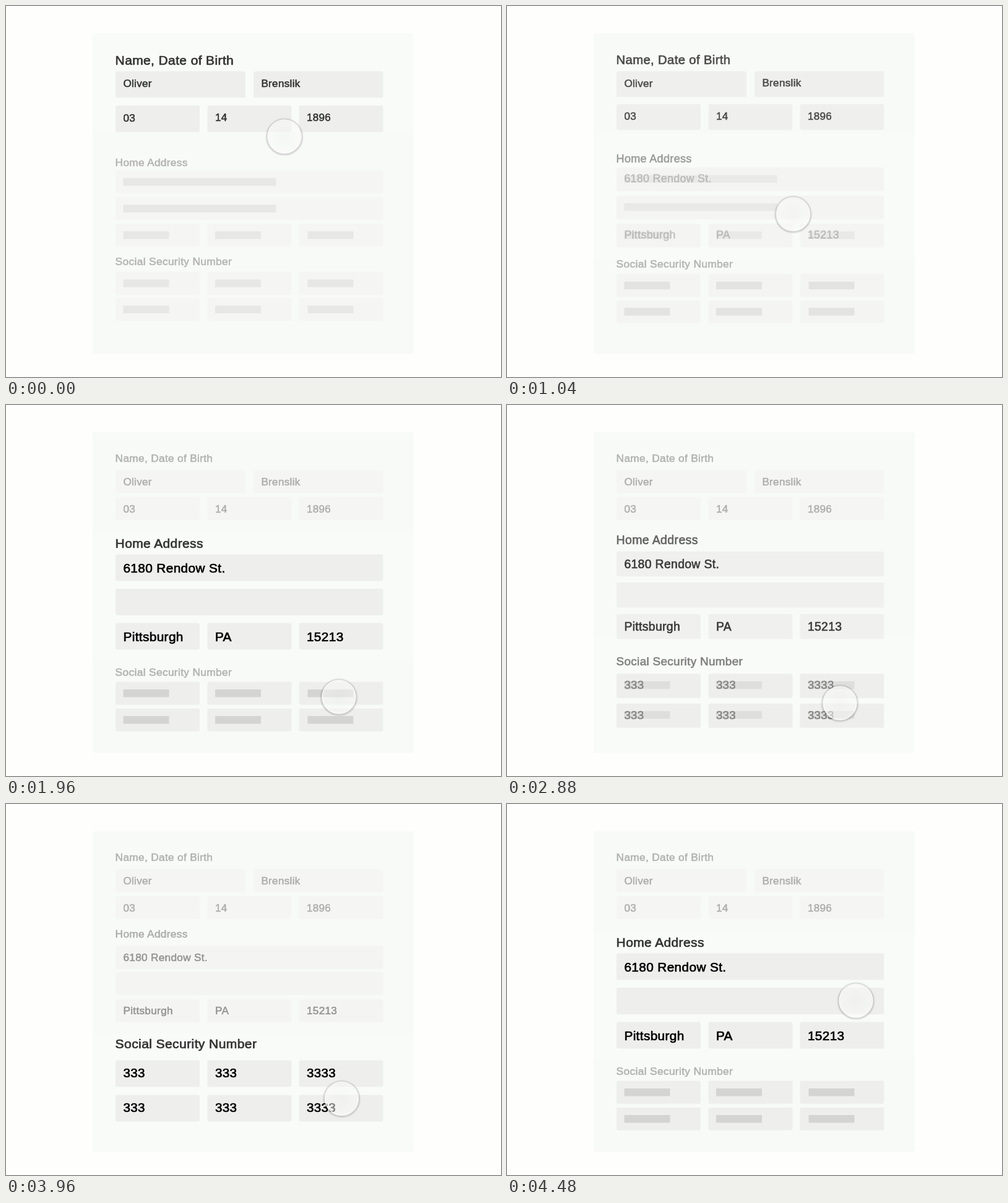
Recreate the animation shown at these times as an HTML page. Size 800 px wide and 600 px high, loop 4760 ms.

```html
<!DOCTYPE html>
<html lang="en">
<head>
<meta charset="utf-8">
<title>Form focus</title>
<style>
  html, body { margin: 0; width: 100%; height: 100%; overflow: hidden; background: #fefefc; }
  svg { display: block; width: 800px; height: 600px; }
  text {
    font-family: "Liberation Sans", Arial, Helvetica, sans-serif;
    letter-spacing: .018em;
    stroke-width: .034em;
    stroke-linejoin: round;
  }
  .shadow { filter: blur(1.3px); }
</style>
</head>
<body>
<svg id="stage" viewBox="0 0 800 600">
  <defs>
    <radialGradient id="glass">
      <stop offset="0" stop-color="#f1f3f0" stop-opacity=".5"/>
      <stop offset="1" stop-color="#fbfcfa" stop-opacity=".52"/>
    </radialGradient>
  </defs>
  <rect x="140" y="44" width="518.5" height="518.5" rx="3" fill="#f8faf8"/>
  <g id="form"></g>
  <g id="cursor">
    <circle class="shadow" cy=".7" r="28.2" fill="none" stroke="#000" stroke-opacity=".22" stroke-width="2.4"/>
    <circle r="27.6" fill="url(#glass)"/>
    <circle r="26.7" fill="none" stroke="#fdfdfc" stroke-opacity=".75" stroke-width="1.8"/>
  </g>
</svg>
<script>
const LOOP = 4760, TICK = 40;
const COLUMNS = {
  1: [[177, 432.5]],
  2: [[177, 210], [400, 209.5]],
  3: [[177, 136], [325.5, 136], [473.5, 136]]
};

// Every list of three holds the values while section 1, 2 or 3 has the focus.
const sections = [
  {
    title: "Name, Date of Birth",
    band: [44, 205],
    head: { y: [95, 91.7, 91.7], size: [21, 17.3, 17.3], gray: [51, 178, 178] },
    box: { h: [43, 37, 37], gray: [238, 245, 245] },
    text: { dy: [25, 24.5, 24.5], size: [17.1, 17.1, 17.1], gray: [51, 174, 174], alpha: [1, 1, 1] },
    bar: { gray: [231, 231, 231], alpha: [0, 0, 0] },
    rows: [
      { y: [105.5, 105.5, 105.5], words: ["Oliver", "Brenslik"] },
      { y: [161, 149, 149], words: ["03", "14", "1896"] }
    ]
  },
  {
    title: "Home Address",
    band: [205, 412],
    head: { y: [258.5, 231, 215.6], size: [17.3, 21, 17.3], gray: [180, 51, 172] },
    box: { h: [37, 43, 37], gray: [245, 238, 244] },
    text: { dy: [22.2, 29.3, 24.1], size: [17.1, 20.8, 17.2], gray: [0, 0, 148], alpha: [0, 1, 1] },
    bar: { gray: [231, 226, 231], alpha: [1, 0, 0], width: 247 },
    rows: [
      { y: [266, 241.5, 229.5], words: ["6180 Rendow St."] },
      { y: [309, 297, 272], words: [""] },
      { y: [352, 352.5, 316], words: ["Pittsburgh", "PA", "15213"] }
    ]
  },
  {
    title: "Social Security Number",
    band: [372, 562],
    head: { y: [419, 438, 395.3], size: [17.4, 17.4, 21.1], gray: [180, 178, 51] },
    box: { h: [37, 37, 43], gray: [245, 238, 238] },
    text: { dy: [23.3, 23.3, 27.2], size: [17.3, 17.3, 20.6], gray: [0, 0, 0], alpha: [0, 0, 1] },
    bar: { gray: [231, 212, 212], alpha: [1, 1, 0] },
    rows: [
      { y: [430, 447.7, 414.5], words: ["333", "333", "3333"] },
      { y: [472.3, 490.7, 470.5], words: ["333", "333", "3333"] }
    ]
  }
];

// lead: how far the easing has run when the change first shows
const focusChanges = [
  { at: 1040, from: 0, to: 1, lead: .155 },
  { at: 2880, from: 1, to: 2, lead: .245 },
  { at: 4320, from: 2, to: 1, lead: .155 }
];

const moves = [
  { start: 215, end: 480, from: [450, 211], to: [462.5, 336.5] },
  { start: 1450, end: 1600, from: [462.5, 336.5], to: [506, 406] },
  { start: 1735, end: 1960, from: [506, 406], to: [538, 472] },
  { start: 2340, end: 2600, from: [538, 472], to: [538, 482] },
  { start: 3935, end: 4160, from: [538, 482], via: [605, 400], to: [564, 318] }
];

const form = document.getElementById("form");
const cursor = document.getElementById("cursor");
const clamp = x => Math.min(1, Math.max(0, x));
const smooth = x => x * x * (3 - 2 * x);
const tone = g => { const n = Math.round(g); return `rgb(${n},${n + 1},${Math.max(0, n - 1)})`; };

// Cubic curve (.25, .1) (.25, 1), solved by bisection.
function ease(x) {
  if (x <= 0 || x >= 1) return clamp(x);
  const curve = (u, a, b) => 3 * u * (1 - u) ** 2 * a + 3 * u * u * (1 - u) * b + u ** 3;
  let low = 0, high = 1;
  for (let i = 0; i < 24; i++) {
    const mid = (low + high) / 2;
    if (curve(mid, .25, .25) < x) low = mid; else high = mid;
  }
  return curve(low, .1, 1);
}

function set(node, attrs) {
  for (const key in attrs) node.setAttribute(key, attrs[key]);
  return node;
}

function add(name, attrs, content = "") {
  const node = set(document.createElementNS("http://www.w3.org/2000/svg", name), attrs);
  node.textContent = content;
  return form.appendChild(node);
}

for (const s of sections) {
  const [top, bottom] = s.band;
  s.bandNode = add("rect", { x: 140, y: top, width: 518.5, height: bottom - top, rx: 2, fill: "#f9fbf9" });
}
for (const s of sections) {
  s.headNode = add("text", { x: 176.6 }, s.title);
  for (const row of s.rows) {
    row.cells = row.words.map((word, i) => {
      const [x, width] = COLUMNS[row.words.length][i];
      return {
        first: i === 0,
        box: add("rect", { x, width, rx: 3 }),
        bar: add("rect", { x: x + (i === 2 ? 14 : 12.5), width: row.words.length === 1 ? s.bar.width : 74, height: 12.5 }),
        text: add("text", { x: x + 12.4 }, word)
      };
    });
  }
}

function focusAt(t) {
  let state = { from: 0, to: 0, p: 0 };
  for (const c of focusChanges) {
    if (t >= c.at) state = { from: c.from, to: c.to, p: ease(c.lead + (t - c.at) / 190) };
  }
  return state;
}

function cursorAt(t) {
  let move = moves[0];
  for (const m of moves) if (t >= m.start) move = m;
  const u = smooth(clamp((t - move.start) / (move.end - move.start)));
  return move.from.map((a, i) => {
    const b = move.to[i], c = move.via ? move.via[i] : (a + b) / 2;
    return a * (1 - u) ** 2 + 2 * c * u * (1 - u) + b * u * u;
  });
}

function draw(t) {
  const { from, to, p } = focusAt(t);
  const mix = v => v[from] + (v[to] - v[from]) * p;
  sections.forEach((s, index) => {
    s.bandNode.setAttribute("opacity", mix([0, 1, 2].map(i => +(i === index))));
    const headTone = tone(mix(s.head.gray)), textTone = tone(mix(s.text.gray));
    set(s.headNode, { y: mix(s.head.y), "font-size": mix(s.head.size), fill: headTone, stroke: headTone });
    for (const row of s.rows) {
      const y = mix(row.y);
      for (const cell of row.cells) {
        const nudge = index === 0 && cell.first ? mix([.8, 0, 0]) : 0;
        set(cell.box, { y, height: mix(s.box.h), fill: tone(mix(s.box.gray)) });
        set(cell.bar, { y: y + 12.3, fill: tone(mix(s.bar.gray)), opacity: mix(s.bar.alpha) });
        set(cell.text, {
          y: y + mix(s.text.dy) + nudge, "font-size": mix(s.text.size),
          fill: textTone, stroke: textTone, opacity: mix(s.text.alpha)
        });
      }
    }
  });
  cursor.setAttribute("transform", `translate(${cursorAt(t)})`);
}

const begin = performance.now();
function play() {
  const t = Math.max(0, performance.now() - begin) % LOOP;
  draw(Math.floor(t / TICK + .001) * TICK);
  requestAnimationFrame(play);
}
play();
</script>
</body>
</html>
```
